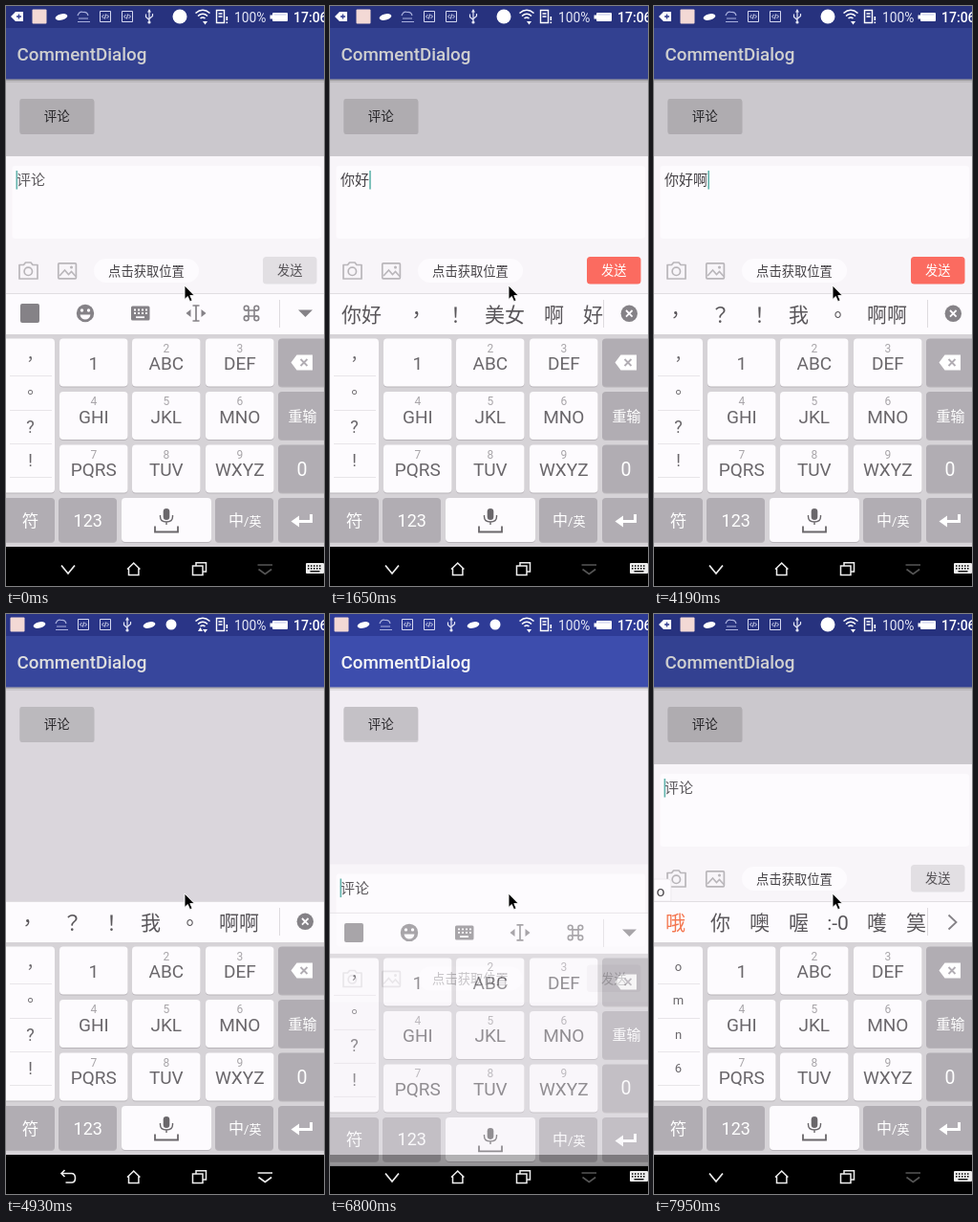
These frames come from a looping animation (333x606 px, 8000 ms). An HTML page:

```html
<!DOCTYPE html>
<html lang="zh-CN">
<head>
<meta charset="utf-8">
<style>
html, body { margin: 0; width: 100%; height: 100%; overflow: hidden; background: #000; }
svg { display: block; width: 100vw; height: 100vh; }
text { font-family: Roboto, 'Noto Sans CJK SC', 'Noto Sans CJK', sans-serif; white-space: pre; }
.mid { text-anchor: middle; }
.tc { font-family: 'Noto Sans CJK TC', 'Noto Sans CJK', sans-serif; }
</style>
</head>
<body>
<svg id="stage" viewBox="0 0 333 606" preserveAspectRatio="none"></svg>
<script>
const LOOP = 8000;
const PAPER = '#fdfbfe', GREY = '#b1adb3', INK = '#6a676b', ICON = '#858287', RED = '#fb6b60';
const FULL_DIM = 0.19;
const stage = document.getElementById('stage');

const rect = (x, y, w, h, fill, r = 0, more = '') =>
  `<rect x="${x}" y="${y}" width="${w}" height="${h}" rx="${r}" fill="${fill}" ${more}/>`;
const path = (d, color, w = 1.5, more = '') =>
  `<path d="${d}" fill="none" stroke="${color}" stroke-width="${w}" ${more}/>`;
const shape = (d, fill) => `<path d="${d}" fill="${fill}"/>`;
const disc = (x, y, r, fill) => `<circle cx="${x}" cy="${y}" r="${r}" fill="${fill}"/>`;
const text = (x, y, s, size, fill, more = 'class="mid"') =>
  `<text x="${x}" y="${y}" font-size="${size}" fill="${fill}" ${more}>${s}</text>`;
const group = (id, body) => `<g id="${id}">${body}</g>`;
const clamp = v => Math.max(0, Math.min(1, v));

// ---- status bar ----
const blob = x => `<ellipse cx="${x}" cy="11.5" rx="6.5" ry="3.2" fill="#fff" transform="rotate(-14 ${x} 11.5)"/>`;
const tile = x => rect(x - 7.5, 3.5, 15, 15, '#f3d9d5', 1);
const lines = x => path(`M${x - 6} 16.5H${x + 7}M${x - 5} 13H${x + 5}M${x - 6} 10Q${x - 4} 5 ${x} 6.5Q${x + 4} 6 ${x + 5} 10`, '#a9b0dd', 1.2);
const codeBox = x => path(`M${x - 5.5} 5.5h11v11h-11zM${x - 1.5} 9l-2 2 2 2M${x + 1.5} 9l2 2-2 2M${x + .6} 8.5l-1.2 5`, '#d5d8f0', 1);
const usb = x => path(`M${x} 4.5V18M${x - 3.5} 8.5v3l3.5 3M${x + 3.5} 8v2.5L${x} 13.5`, '#e4e6f6', 1.2) +
  shape(`M${x - 2} 6.5L${x} 3l2 3.5z`, '#e4e6f6') + disc(x, 17, 1.6, '#e4e6f6');
const idleIcons = x => tile(x) + blob(x + 23) + lines(x + 46) + codeBox(x + 69) + codeBox(x + 92) + usb(x + 115);

const statusBar =
  group('iconsIdle', idleIcons(12) + blob(150) + disc(173, 11, 5.5, '#fff')) +
  group('iconsIme', shape('M5 11l5-5v10zM10 6h8v10h-8z', '#fff') + path('M11 11h5M13.5 8.500v5', '#2f3a90', 1.3) +
    idleIcons(35) + disc(182, 11, 7.5, '#fff')) +
  path('M198.500 7.500Q206 1 213.500 7.500M201 10.500Q206 6 211 10.500M203.500 13Q206 11 208.500 13', '#fff', 1.6) +
  shape('M206 16h5l-2.500 3.500z', '#fff') +
  group('tick', shape('M201 18h5l-2.500-4z', '#fff')) +
  path('M220.500 4.500h8v13h-8zM222.500 8h4M222.500 11h4', '#fff', 1.4) + rect(230.5, 11, 1.6, 4, '#fff') + rect(230.5, 16.5, 1.6, 1.6, '#fff') +
  text(239, 16.5, '100%', 13.8, '#e6e8f6', '') +
  rect(279, 7, 16, 9, '#fff', 1) + rect(276.5, 9.5, 3, 4, '#fff') + path('M281 9h12', '#c9cdec', 1) +
  text(301, 16.500, '17:06', 14, '#fff', 'font-weight="500"');

// ---- page behind the dialog ----
const page =
  rect(0, 0, 333, 566, '#faf6fc') + rect(0, 0, 333, 23, '#303d9b') + rect(0, 23, 333, 53.5, '#3f50b3') +
  rect(0, 76.5, 333, 1.5, '#000', 0, 'opacity=".22"') + rect(0, 78, 333, 2, '#000', 0, 'opacity=".07"') +
  text(11.5, 57, 'CommentDialog', 18.8, '#fff', 'font-weight="500"') +
  rect(14.5, 98, 78, 36, '#000', 2, 'opacity=".14"') + rect(14.5, 97, 77.5, 35.5, '#d7d4d9', 2) +
  rect(14.5, 97, 77.5, 35.5, '#000', 2, 'id="ripple"') +
  text(53.3, 120, '评论', 13.5, '#2d2b2f', 'class="mid" font-weight="500"');

// ---- comment dialog ----
const dialog =
  rect(0, 157, 333, 144, '#f8f5f9') + rect(6.5, 167, 323.5, 76, PAPER, 3) +
  '<text id="typed" x="11" y="187.300" font-size="15"></text>' +
  rect(11, 172, 1.6, 19.5, '#62b3ac', 0, 'id="caret"') +
  path('M14 270.500h4.500l2-2.500h5.500l2 2.500h5v14.500h-19z', '#b9b6ba', 1.7, 'stroke-linejoin="round"') +
  `<circle cx="23.300" cy="277.300" r="4.200" fill="none" stroke="#b9b6ba" stroke-width="1.700"/>` +
  rect(54.8, 268.8, 18.6, 16, 'none', 1, 'stroke="#b9b6ba" stroke-width="1.700"') +
  path('M56 282l5.500-6 4 4.500 3-3 4.500 5', '#b9b6ba', 1.6) + disc(68.5, 273, 1.5, '#b9b6ba') +
  rect(92, 264, 110, 25, PAPER, 12.5) + text(147, 281.5, '点击获取位置', 13.3, '#444145') +
  rect(269, 262, 56.5, 28.5, '#e2dfe3', 3.5, 'id="send"') +
  '<text id="sendText" class="mid" x="297.200" y="281.300" font-size="13.300">发送</text>';

// ---- keyboard ----
function key(x, y, w, h, fill) {
  return rect(x, y + 1, w, h, '#b9b5ba', 4) + rect(x, y, w, h, fill, 4);
}
const letters = ['1', 'ABC', 'DEF', 'GHI', 'JKL', 'MNO', 'PQRS', 'TUV', 'WXYZ'];
const colX = [56, 132, 209], rowY = [347.500, 403, 458.500];
const letterKeys = letters.map((s, i) => {
  const x = colX[i % 3], y = rowY[i / 3 | 0], mid = x + 35.800;
  return key(x, y, 71.5, 50, PAPER) + (i ? text(mid, y + 14, i + 1, 12, '#a8a5a9') : '') +
    text(mid, y + 32.500, s, 19, INK);
}).join('');

const keyboard =
  rect(0, 301, 333, 264, '#d6d3d7') + rect(0, 301, 333, 42, PAPER) + rect(0, 300, 333, 1, '#e1dee2') +
  group('bar', '') + letterKeys +
  key(-3, 347.5, 54, 161, PAPER) + [386, 422, 457, 492].map(y => rect(4, y, 44, 1, '#e8e5e9')).join('') + group('side', '') +
  rowY.map(y => key(285, y, 54, 50, GREY)).join('') +
  shape('M298.500 372.500l6-8h16.500v16h-16.500z', '#fff') + path('M308.500 369l7 7M315.500 369l-7 7', GREY, 1.8) +
  text(310.5, 433.5, '重输', 15, '#fff') + text(310, 490.5, '0', 19.500, '#fff') +
  key(-3, 514, 54, 46, GREY) + text(25.5, 543.5, '符', 17.5, '#fff') +
  key(55, 514, 61, 46, GREY) + text(85.800, 543.5, '123', 18, '#fff') +
  key(121, 514, 94, 46, PAPER) + rect(164.700, 525, 6.600, 12, INK, 3.3) +
  path('M161.500 532v1.500q0 5.500 6.500 5.500t6.500-5.500V532M168 539v3', INK, 1.4) + path('M156 543.500v6h24v-6', INK, 1.8) +
  key(219, 514, 61, 46, GREY) +
  '<text x="233" y="543" font-size="16" fill="#fff">中<tspan font-size="13">/英</tspan></text>' +
  key(285, 514, 54, 46, GREY) + path('M319.500 531v7.500h-14', '#fff', 3) + shape('M298.500 538.500l8.500-6v12z', '#fff');

const toolbar =
  rect(15, 311, 20, 20, ICON, 2) +
  disc(83, 321, 9.2, ICON) + disc(79.5, 318, 1.7, PAPER) + disc(86.5, 318, 1.7, PAPER) + shape('M77.500 322.500h11q-1 5-5.500 5t-5.500-5z', PAPER) +
  rect(131, 313.5, 19.5, 15, ICON, 1.5) +
  path('M134 317.500h14M134 321h14', PAPER, 1.8, 'stroke-dasharray="2 2"') + path('M136 325.200h9', PAPER, 1.8) +
  path('M195.500 313h7M199 313v16M195.500 329h7', ICON, 1.7) +
  shape('M188.500 321l5-4v8zM209.500 321l-5-4v8z', ICON) +
  path('M254 318h6v6h-6z', ICON, 1.6) +
  [[-1, -1], [1, -1], [-1, 1], [1, 1]].map(([a, b]) =>
    `<circle cx="${257 + a * 5.300}" cy="${321 + b * 5.300}" r="2.400" fill="none" stroke="${ICON}" stroke-width="1.600"/>`).join('') +
  rect(286, 307, 1, 29, '#dedbdf') + shape('M306 317.500h15l-7.500 7.500z', ICON);

function candidates(list, composing, pressed) {
  let x = 0;
  let out = pressed ? rect(0, 301, 70.5, 41, '#e3e0e4') : '';
  list.forEach((s, i) => {
    const w = (s === ':-0' ? 1 : s.length) * 21, lead = i ? 10 : 12;
    const punct = /[，。？！]/.test(s) ? 'class="mid tc"' : 'class="mid"';
    out += text(x + lead + w / 2, 329.7, s, 21, composing && !i ? '#f4764f' : '#59565a', punct);
    x += w + (i ? 20 : 28);
  });
  const end = composing
    ? path('M308.500 314.500l8 7.500-8 7.500', ICON, 1.8)
    : disc(313.300, 321.300, 8.700, ICON) + path('M310 318l6.600 6.600M316.600 318l-6.600 6.600', PAPER, 1.8);
  return `<g clip-path="url(#barClip)">${out}</g>` + rect(286, 307, 1, 29, '#dedbdf') + end;
}

// ---- navigation bar ----
const hideIcon = color => path('M263.500 584h15.500M264.500 588.500l6.800 5 6.800-5', color, 1.6);
const nav = rect(0, 565, 333, 41, '#000') +
  path('M127 588.500l6.700-6.500 6.700 6.500M128.500 587.500v7h10.400v-7', '#eee', 1.5) +
  path('M195.500 585h10.500v9.500h-10.500zM199 584.500v-2.800h10.500v9.300h-3', '#eee', 1.5) +
  group('navIme', path('M58 584.500l7 8.500 7-8.500', '#eee', 1.7) + hideIcon('#555') +
    rect(314, 582, 19, 11, '#eee', 1) + path('M316 585h15M316 587.800h15', '#000', 1.400, 'stroke-dasharray="1.500 1.500"') + path('M318.500 590.700h10', '#000', 1.3)) +
  group('navIdle', path('M61.500 581l-3.500 3.500 3.500 3.500M58.500 584.500h10q4 0 4 4.800t-4 4.700h-6', '#eee', 1.6) + hideIcon('#eee'));

stage.innerHTML =
  '<defs><clipPath id="barClip"><rect x="0" y="301" width="286" height="42"/></clipPath></defs>' +
  page + rect(0, 0, 333, 565, '#000', 0, 'id="dim"') + statusBar + group('dialog', dialog) + nav +
  group('keys', keyboard) +
  group('popup', '<path id="popupBox" fill="#fdfbfe" stroke="#e4e1e5" stroke-width=".600"/>' +
    '<text id="popupText" x="2.500" y="295" font-size="15.500" fill="#4b484c"></text>') +
  '<path d="M187 292v14.500l3.300-3 2.300 5.200 2.500-1.100-2.300-5h4.500z" fill="#000" stroke="#fff" stroke-width=".900"/>';

const el = {};
stage.querySelectorAll('[id]').forEach(n => el[n.id] = n);
const show = (n, on) => n.style.display = on ? '' : 'none';

// ---- timeline: start, composing text, candidates, side column ----
const PUNCT = '， 。 ? !', O_LIST = '哦 你 噢 喔 :-0 嚄 筽';
const steps = [
  [0, '', '', PUNCT],
  [270, 'o', O_LIST, 'o m n 6'],
  [470, 'ni', '你 米 密 迷 秘 泥 尼', 'ni mi o m'],
  [660, "ni'h", '你好 你会 你还 密 你', 'ni mi o m'],
  [850, "ni'ha", '你哈 你还 你 米 密', 'ni mi o m'],
  [1090, "ni'hao", '你好 你号 你 米 密', 'ni mi o m'],
  [1590, '', '你好 ， ！ 美女 啊 好', PUNCT],
  [2720, 'a', '啊 不 吧 才 啊啊 擦', 'a b c 2'],
  [3130, '', '， ？ ！ 我 。 啊啊', PUNCT],
  [6600, '', '', PUNCT],
  [7720, 'o', O_LIST, 'o m n 6']
];
const caretOff = [[400, 900], [1440, 1590], [2150, 2720], [3660, 4190], [4670, 4930], [7300, 7800]];
let lastBar = '';

function drawBar(t) {
  const step = steps.filter(s => s[0] <= t).pop();
  const pressed = t >= 1330 && t < 1590;
  const id = step[0] + '/' + pressed;
  if (id === lastBar) return;
  lastBar = id;
  const [, word, list, side] = step;
  el.bar.innerHTML = list ? candidates(list.split(' '), word, pressed) : toolbar;
  el.side.innerHTML = side.split(' ').map((s, i) => {
    const y = 368.5 + i * 35.300;
    return /[，。]/.test(s) ? text(25.5, y + 6, s, 17, INK, 'class="mid tc"') : text(25.5, y + (word ? 4.500 : 6.500), s, word ? 13 : 18, INK);
  }).join('');
  show(el.popup, word);
  el.popupText.textContent = word;
  const w = word ? el.popupText.getComputedTextLength() + 9 : 0;
  el.popupBox.setAttribute('d', `M0 277H${w - 3}q3 0 3 3V300H0z`);
}

function draw(t) {
  drawBar(t);
  const open = t < 4930 || t >= 6690;
  const rise = t < 6000 ? 1 : 1 - Math.pow(1 - clamp((t - 6740) / 210), 2.7);

  show(el.dialog, open);
  el.dialog.setAttribute('transform', `translate(0 ${264 * (1 - rise)})`);
  el.dialog.setAttribute('opacity', t < 6000 ? 1 : clamp((t - 6680) / 80));

  const shown = t < 6000 ? 1 - clamp((t - 5010) / 220) : rise;
  show(el.keys, shown > 0);
  el.keys.setAttribute('transform', `translate(0 ${30 * (1 - shown)})`);
  el.keys.setAttribute('opacity', Math.min(1, shown * 1.17));

  const dim = t < 4930 ? FULL_DIM : t < 6000 ? 0.13 * (1 - clamp((t - 4930) / 170)) : FULL_DIM * clamp((t - 6760) / 220);
  el.dim.setAttribute('opacity', dim);
  const press = t < 6630 ? 0 : clamp((t - 6630) / 120) * (1 - clamp((t - 6850) / 250));
  el.ripple.setAttribute('opacity', 0.055 * press);

  const value = t < 1590 || t >= 4930 ? '' : t < 3130 ? '你好' : '你好啊';
  el.typed.textContent = value || '评论';
  el.typed.setAttribute('fill', value ? '#454246' : '#5d5a5e');
  el.caret.setAttribute('x', value ? 10.8 + value.length * 15.200 : 10.5);
  show(el.caret, !caretOff.some(([a, b]) => t >= a && t < b));
  el.send.setAttribute('fill', value ? RED : '#e2dfe3');
  el.sendText.setAttribute('fill', value ? '#fff' : '#555256');

  const ime = t < 4930 || t >= 7100, navIme = t < 4930 || t >= 6740;
  show(el.iconsIme, ime);
  show(el.iconsIdle, !ime);
  show(el.navIme, navIme);
  show(el.navIdle, !navIme);
  show(el.tick, t >= 4490 && t < 6420);
}

const start = performance.now();
function frame() {
  draw((performance.now() - start) % LOOP);
  requestAnimationFrame(frame);
}
frame();
</script>
</body>
</html>
```
